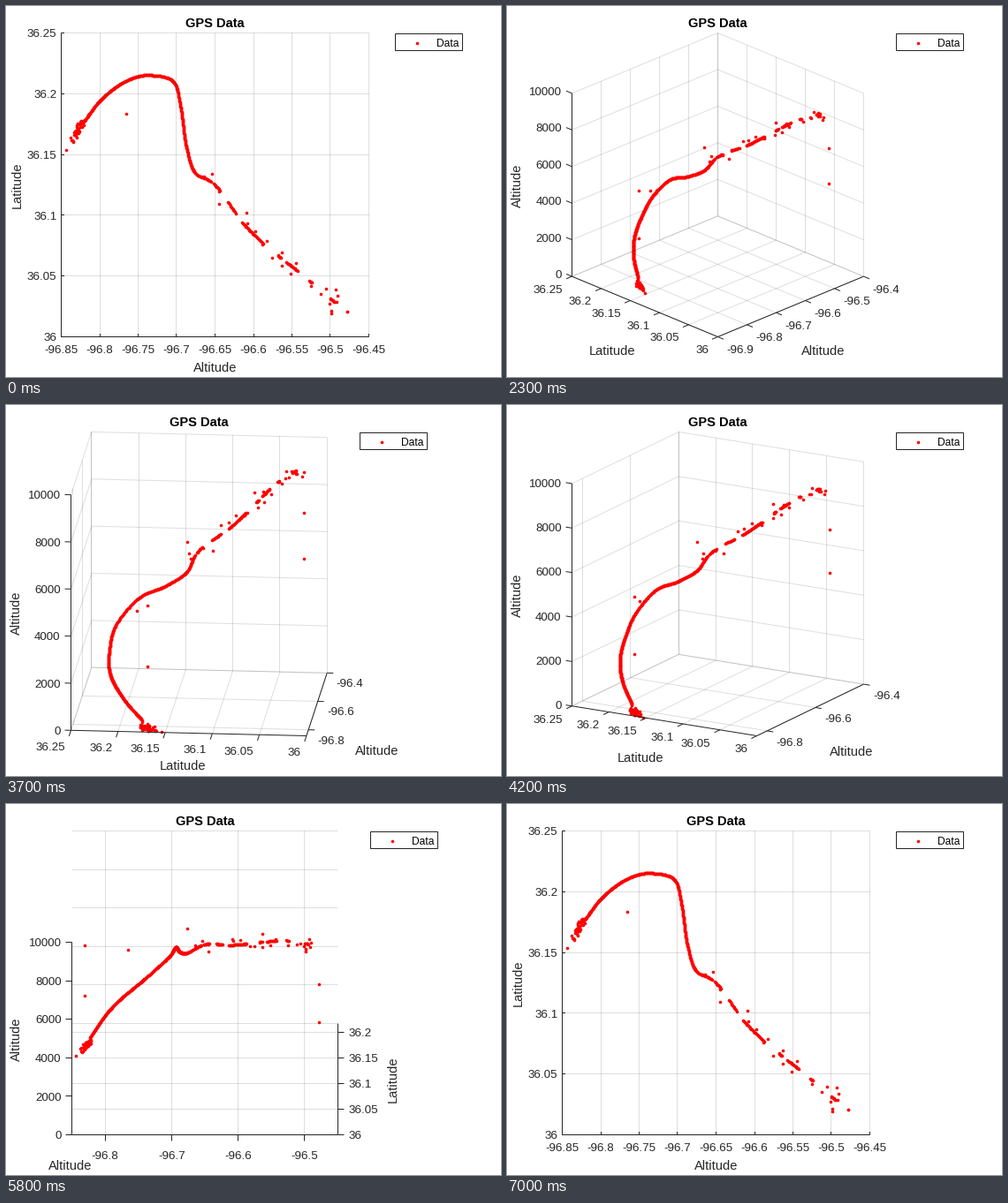
Animation, 560 px wide and 420 px high, one loop 7100 ms. Source, as a matplotlib script:

```python
import numpy as np
import matplotlib.pyplot as plt
from matplotlib.animation import FuncAnimation
from matplotlib.patches import Rectangle

W, H, PT = 560, 420, 0.72          # stage in pixels, points per pixel
TOP, BOTTOM = 30, 374
INK = (0.15, 0.15, 0.15)
plt.rcParams["font.family"] = "Liberation Sans"

# Key points of the flight: millidegrees east of -97, north of 36, altitude
PATH = np.array([(177, 176, 400), (202, 196.2, 1100), (268, 215.5, 2650),
                 (297, 208.6, 3760), (305, 188, 4730), (312, 157, 5320),
                 (323, 135.5, 5860), (343, 128.6, 6410), (387, 93, 7390),
                 (475, 45, 8870), (512, 25, 9220)])
# Stretches with reception after the dense part: middle and half width
BURSTS = [(334, 10), (351, 4), (371, 5), (399, 14), (434, 2), (450, 7),
          (474, 1), (502, 3)]
FAR_OFF = [(168.6, 170, 5310), (168.6, 170, 2730), (234, 184, 4700),
           (323, 135, 7130), (521, 21, 7270), (521, 21, 5330)]


def flight(rng):
    steps = np.hypot(*np.diff(PATH[:, :2], axis=0).T)
    dist = np.r_[0, np.cumsum(steps)]
    slopes = np.gradient(PATH, dist, axis=0)

    def along(d):
        """Cubic Hermite through the key points at distance d."""
        i = np.clip(np.searchsorted(dist, d) - 1, 0, len(PATH) - 2)
        h = steps[i][:, None]
        s = (d - dist[i])[:, None] / h
        return ((1 + 2*s) * (1 - s)**2 * PATH[i] + h * s * (1 - s)**2 * slopes[i]
                + s**2 * (3 - 2*s) * PATH[i + 1] + h * s**2 * (s - 1) * slopes[i + 1])

    def at_longitude(lon):
        return along(np.interp(lon, PATH[:, 0], dist))

    dense = along(np.linspace(0, dist[6], 300))
    bursts = [at_longitude(np.linspace(m - w, m + w, 2 * w + 2)) for m, w in BURSTS]
    strays = at_longitude(rng.uniform(320, 512, 24))
    strays += rng.normal(0, (0, 6, 120), strays.shape)
    s = rng.normal(0.5, 0.25, (50, 1))
    takeoff = (160, 159, 0) + s * (17, 18, 200) + rng.normal(0, (1.8, 2.2, 80), (50, 3))
    takeoff[:, 2] = np.abs(takeoff[:, 2])
    return np.vstack([dense, *bursts, strays, takeoff, FAR_OFF])


DATA = flight(np.random.default_rng(4))


def camera(frame):
    """Azimuth and elevation in degrees; 5 degrees per frame."""
    if frame < 10:
        return 0, 90
    if frame < 26:
        return -45, 90 - 5 * (frame - 10)
    if frame < 36:
        return -45 - 5 * (frame - 26), 15
    if frame < 55:
        return -90 + 5 * (frame - 36), 15
    return 0, 15 + 5 * (frame - 55)


class View:
    def __init__(self, az, el):
        self.az, self.el = az, el
        self.flat = (az, el) == (0, 90)
        a, e = np.radians([az, el])
        ca, sa, ce, se = np.round([np.cos(a), np.sin(a), np.cos(e), np.sin(e)], 9)
        span = ca - sa
        self.left, self.right = self.sides(ca / span)
        sx = (self.right - self.left) / span
        sy = (BOTTOM - TOP) / (se * span + ce)
        self.origin = np.array([self.left - sa * sx, BOTTOM])
        self.basis = np.array([(ca * sx, se * sa * sy), (sa * sx, -se * ca * sy),
                               (0, -ce * sy)])
        self.scale_axes()

    def sides(self, c):
        """Plot box edges, leaving room for the labels on the right."""
        if self.flat:
            return 62, 410
        if self.az == 0:
            return 74, 375 if self.el >= 20 else 383
        if self.az == -90:
            return 74, 378
        return 73, min(403, 343.5 + 239 * c)

    def scale_axes(self):
        """Wider tick steps for axes that look short."""
        nx, ny, nz = np.hypot(*self.basis.T)
        if self.az == 0:
            xs, xlim = (50 if self.flat else 100), (150, 550)
            ys = 50 if self.el >= 20 else 100
            ylim = (0, 250 if ny > 200 else 216.5)
        else:
            xs, xlim = (100, (100, 600)) if nx > 150 else (200, (157.5, 600))
            ys, ylim = (50, (0, 250)) if ny > 150 else (100, (0, 216.5))
        zs = 2000 if nz > 150 else 5000 if nz > 40 else 10000
        self.lims = np.array([xlim, ylim, (0, 10000)])
        self.ticks = []
        for (lo, hi), step in zip(self.lims, (xs, ys, zs)):
            values = np.arange(0, hi + 1, step)
            values = values[values >= lo]
            self.ticks.append((values, (values - lo) / (hi - lo)))

    def project(self, unit):
        return self.origin + np.asarray(unit, float) @ self.basis

    def locate(self, data):
        lo, hi = self.lims.T
        return self.project((data - lo) / (hi - lo))


fig = plt.figure(figsize=(W / 100, H / 100), dpi=100, facecolor="white")
ax = fig.add_axes([0, 0, 1, 1])


def line(p, q, alpha=1.0):
    """One pixel wide; upright and level lines sit on whole pixels."""
    xy = np.transpose([p, q])
    for row in xy:
        if abs(row[0] - row[1]) < 0.01:
            row[:] = np.round(row[0])
    ax.plot(*(xy + .5), color=INK, lw=PT, alpha=alpha, solid_capstyle="butt",
            snap=False)


def text(x, y, s, px, ha="center", color=INK, rotation=0, weight="normal"):
    """Place text by the middle of its capitals."""
    drop = 0.36 * px
    dx, dy = (drop, 0) if rotation else (0, drop)
    ax.text(x + .5 + dx, y + .5 + dy, s, fontsize=px * PT, ha=ha, va="baseline",
            color=color, rotation=rotation, rotation_mode="anchor", weight=weight)


def dots(x, y):
    ax.scatter(np.round(x) + .5, np.round(y) + .5, s=(3.6 * PT)**2, c="red", lw=0)


def draw_grid(v):
    def grid(p, q):
        line(v.project(p), v.project(q), 0.15)

    # A wall seen edge-on has no grid
    x_wall = v.az < 0 and v.el < 90
    y_wall = v.az > -90 and v.el < 90
    xs, ys, zs = (unit for _, unit in v.ticks)
    for t in xs:
        grid((t, 0, 0), (t, 1, 0))
        if y_wall:
            grid((t, 1, 0), (t, 1, 1))
    for t in ys:
        grid((0, t, 0), (1, t, 0))
        if x_wall:
            grid((1, t, 0), (1, t, 1))
    for t in zs:
        if y_wall:
            grid((0, 1, t), (1, 1, t))
        if x_wall:
            grid((1, 1, t), (1, 0, t))


def draw_axis(v, k, start, out, names):
    """Axis k from a unit-cube corner, with ticks along the vector out."""
    corner = np.array(start, float)
    corner[k] = 1
    line(v.project(start), v.project(corner))
    d = np.asarray(out, float) @ v.basis
    d /= np.hypot(*d)
    for t, name in zip(v.ticks[k][1], names):
        corner[k] = t
        p = v.project(corner)
        tip = p - 3.5 * d if v.flat else p + 7 * d
        line(p, tip)
        base = p if v.flat else tip
        if abs(d[0]) < 1e-6:
            ha, shift = "center", (0, 14 if v.flat else 16)
        elif k == 2 or v.flat:
            ha, shift = "right", (-5, 0)
        elif abs(d[1]) < 1e-6:
            ha, shift = "left", (5.5, 0)
        elif d[0] > 0:
            ha, shift = "left", (3.5, 11)
        else:
            ha, shift = "right", (-4, 11)
        text(*(base + shift), name, 13.33, ha)


def draw_label(v, k, name, side):
    mid = v.project(np.eye(3)[k] / 2)
    size = 14.67
    if v.az in (0, -90):
        level = (k == 0) == (v.az == 0)
        if level:
            text(mid[0] if v.flat else v.left - 2, 408, name, size)
        else:
            text(10.5 if v.flat else 435.5, mid[1] + .5, name, size, rotation=90)
    else:
        c = abs(v.basis[k, 0]) / (v.right - v.left)
        rise = 31 * (np.sin(np.radians(v.el)) - 0.259)
        text(mid[0] + side * (73.5 - 73 * c), mid[1] + 53 - 18 * c + rise, name, size)


def draw_legend(v):
    x = round(v.right) + (30 if v.flat else 37)
    ax.add_patch(Rectangle((x + .5, 31.5), 76, 19, fc="white", ec=INK, lw=PT,
                           snap=False))
    dots(x + 24, 41)
    text(x + 47, 41.5, "Data", 12, "left", "black")


def draw(frame):
    ax.cla()
    ax.set(xlim=(0, W), ylim=(H, 0))
    ax.axis("off")
    v = View(*camera(frame))
    draw_grid(v)

    lon, lat, alt = (values for values, _ in v.ticks)
    front = v.az == 0 and not v.flat
    draw_axis(v, 0, (0, 0, 0), (0, -1, 0), [f"{-97 + t / 1000:g}" for t in lon])
    draw_axis(v, 1, (int(front), 0, 0), (1 if front else -1, 0, 0),
              [f"{36 + t / 1000:g}" for t in lat])
    if v.el < 90:
        foot, out = ((0, 0, 0), (-1, 0, 0)) if front else ((0, 1, 0), (0, 1, 0))
        draw_axis(v, 2, foot, out, [f"{t:.0f}" for t in alt])
        middle = v.project(foot) + v.basis[2] / 2
        text(10.5, middle[1] + .5, "Altitude", 14.67, rotation=90)
    draw_label(v, 0, "Altitude", 1)
    draw_label(v, 1, "Latitude", -1)

    dots(*v.locate(DATA).T)
    text((v.left + v.right) / 2, 18.5, "GPS Data", 14.67, color="black", weight="bold")
    draw_legend(v)
    return []


anim = FuncAnimation(fig, draw, frames=71, interval=100, init_func=lambda: [],
                     repeat=True, repeat_delay=0)
plt.show()
```
